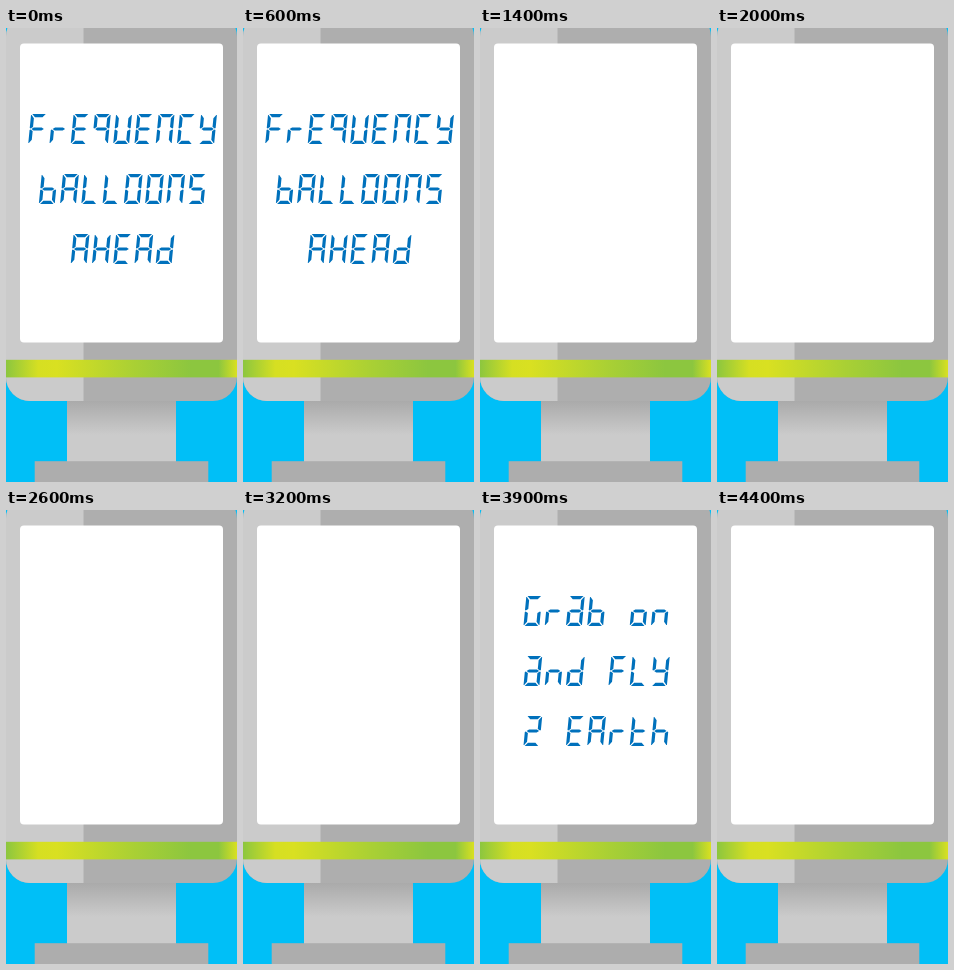
An HTML page for the animation above (4.5 s loop, 231x454 px).

```html
<!DOCTYPE html>
<html lang="en">
<head>
<meta charset="utf-8">
<title>Blinking sign</title>
<style>
  html, body { margin: 0; width: 100%; height: 100%; overflow: hidden; background: #00bff7; }
  svg { display: block; width: 100vw; height: 100vh; }
</style>
</head>
<body>
<svg viewBox="0 0 231 454" role="img">
  <defs>
    <linearGradient id="stem" x1="0" y1="373" x2="0" y2="407" gradientUnits="userSpaceOnUse">
      <stop stop-color="#aaa"/>
      <stop offset="1" stop-color="#cbcbcb"/>
    </linearGradient>
    <linearGradient id="band">
      <stop stop-color="#8cc63f"/>
      <stop offset=".14" stop-color="#d6df22"/>
      <stop offset=".22" stop-color="#d9e021"/>
      <stop offset=".55" stop-color="#aad034"/>
      <stop offset=".8" stop-color="#8cc63f"/>
      <stop offset=".92" stop-color="#8cc63f"/>
      <stop offset="1" stop-color="#d9e021"/>
    </linearGradient>
    <clipPath id="case"><rect y="-15.5" width="231" height="388.5" rx="24"/></clipPath>
  </defs>
  <rect width="231" height="454" fill="#00bff7"/>
  <rect x="61" y="372" width="109" height="62" fill="url(#stem)"/>
  <rect x="28.7" y="433.2" width="173.6" height="21" fill="#adadad"/>
  <g clip-path="url(#case)">
    <rect y="-16" width="231" height="389" fill="#aeaeae"/>
    <rect y="-16" width="77.5" height="389" fill="#cbcbcb"/>
  </g>
  <rect y="331.8" width="231" height="17.6" fill="url(#band)"/>
  <rect x="14" y="15.5" width="203" height="299" rx="4" fill="#fff"/>
  <g id="messages" fill="#0071bc"></g>
</svg>
<script>
const LOOP = 4500, BLINK = 300, LIT = 200, SWAP = 2100;
const PITCH = 21.25, WIDTH = 15.9, HEIGHT = 30, SLANT = 2.9, THICK = 3.2;
const MESSAGES = [
  ['FrEQUENCY', 'bALLOONS', 'AHEAd'],
  ['Grab on', 'and FLY', '2 EArth']
];
const LETTERS = {
  A: 'abcefg', C: 'adef', E: 'adefg', F: 'aefg', G: 'acdef', H: 'bcefg', L: 'def',
  N: 'abcef', O: 'abcdef', Q: 'abcfg', S: 'acdfg', U: 'bcdef', Y: 'bcdfg',
  a: 'abcdeg', b: 'cdefg', d: 'bcdeg', h: 'cefg', n: 'ceg', o: 'cdeg', r: 'eg', t: 'defg',
  2: 'abdeg'
};

const mirrorX = points => points.map(([x, y]) => [WIDTH - x, y]);
const mirrorY = points => points.map(([x, y]) => [x, HEIGHT - y]);
const mid = HEIGHT / 2;
const cap = [[1.2, 0], [WIDTH - 1.2, 0], [WIDTH - THICK - 1, THICK], [THICK + 1, THICK]];
const side = [[0, 1], [.6, 1], [THICK, THICK + 1], [THICK, mid - 2], [.8, mid - .5], [0, mid - .9]];
const bar = [[1.7, mid], [THICK + .8, mid - 1.6], [WIDTH - THICK - .8, mid - 1.6],
  [WIDTH - 1.7, mid], [WIDTH - THICK - .8, mid + 1.6], [THICK + .8, mid + 1.6]];
const SEGMENTS = {
  a: cap, b: mirrorX(side), c: mirrorX(mirrorY(side)), d: mirrorY(cap),
  e: mirrorY(side), f: side, g: bar
};

function segmentPath(points, left, y0) {
  return 'M' + points.map(([x, y]) =>
    (left + x + SLANT * (1 - y / HEIGHT)).toFixed(2) + ' ' + (y0 + y).toFixed(2)).join('L') + 'Z';
}

function linePath(text, row) {
  const start = 116.6 - ((text.length - 1) * PITCH + WIDTH + SLANT) / 2;
  return [...text].map((ch, i) => [...(LETTERS[ch] || '')].map(name =>
    segmentPath(SEGMENTS[name], start + i * PITCH, 86 + row * 60)).join('')).join('');
}

const paths = MESSAGES.map(lines => {
  const path = document.createElementNS('http://www.w3.org/2000/svg', 'path');
  path.setAttribute('d', lines.map(linePath).join(''));
  path.setAttribute('aria-label', lines.join(' '));
  document.getElementById('messages').append(path);
  return path;
});

function draw(time) {
  const t = time % LOOP;
  const current = t < SWAP ? 0 : 1;
  const lit = t % BLINK < LIT;
  paths.forEach((path, i) =>
    path.setAttribute('visibility', lit && i === current ? 'visible' : 'hidden'));
}

const began = performance.now();
function tick() {
  draw(performance.now() - began);
  requestAnimationFrame(tick);
}
tick();
</script>
</body>
</html>
```
